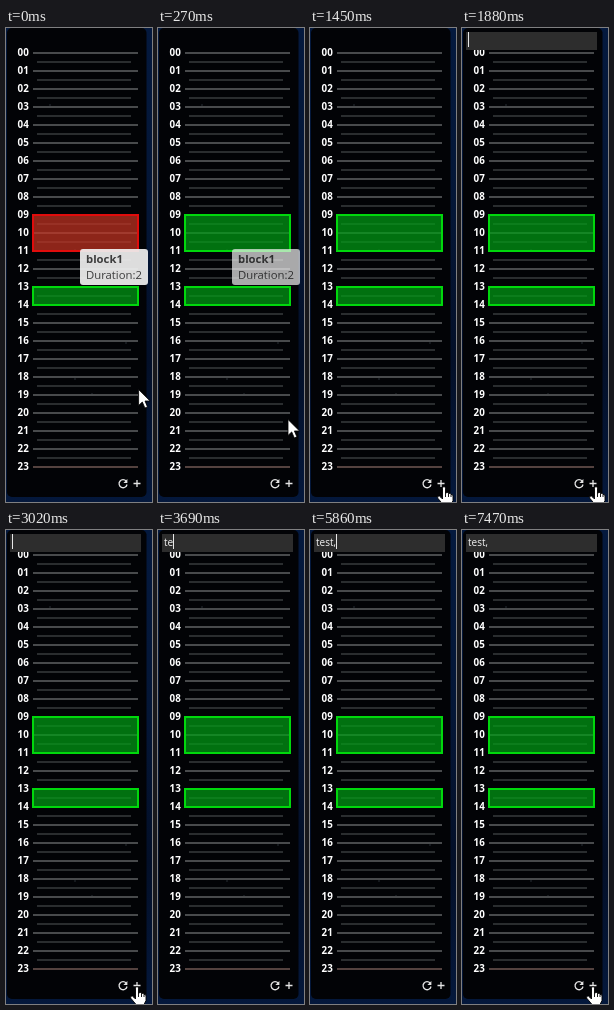
Animation of 146x474 px, one loop 8000 ms. Source, as an HTML page:

```html
<!DOCTYPE html>
<html lang="en">
<head>
<meta charset="utf-8">
<title>Day planner</title>
<style>
html, body { margin: 0; width: 100%; height: 100%; overflow: hidden; background: #030917; }
svg { display: block; }
text { font-family: "Open Sans", "Noto Sans", sans-serif; white-space: pre; }
.hour { font-size: 9.8px; font-weight: 700; fill: #fff; text-anchor: middle; }
.tip { font-size: 11.3px; fill: #404040; }
</style>
</head>
<body>
<svg width="146" height="474" viewBox="0 0 146 474">
  <defs>
    <linearGradient id="sky" x2="0" y2="1">
      <stop offset="0" stop-color="#04193e"/>
      <stop offset=".4" stop-color="#041636"/>
      <stop offset=".7" stop-color="#030f28"/>
      <stop offset="1" stop-color="#04183c"/>
    </linearGradient>
  </defs>
  <rect width="146" height="474" fill="url(#sky)"/>
  <rect x="1" width="139.5" height="469" rx="5" fill="#020306"/>
  <path d="M44 77h0M108 151h0M111 169h0M69 222h0M120 315h0M69 351h0M86 366h0" stroke="#1b1f24" stroke-width="2" stroke-linecap="round"/>
  <g id="grid"></g>
  <g stroke-width="2">
    <rect id="block1" x="27" y="187" width="105" height="36" fill-opacity=".7"/>
    <rect x="27" y="259" width="105" height="18" fill="#00a014" fill-opacity=".7" stroke="#00d80c"/>
  </g>
  <g fill="none" stroke="#e4e4e4" stroke-width="1.3">
    <path d="M120.2 453.2A4 4 0 1 0 121 456.5"/>
    <path d="M121.4 451V455H117.4Z" fill="#e4e4e4" stroke="none"/>
    <path d="M127.5 455.5H134.5M131 452V459"/>
  </g>
  <g id="tooltip">
    <rect x="74" y="221" width="68" height="36" rx="3" fill="#f0f0f0"/>
    <text class="tip" x="80" y="235" font-weight="700">block1</text>
    <text class="tip" x="80" y="251">Duration:2</text>
  </g>
  <g id="field">
    <rect x="4" y="4" width="131" height="18" fill="#2d2d2d"/>
    <text id="typed" x="6" y="15.5" font-size="10" fill="#f2f2f2"></text>
    <rect id="caret" y="4" width="1" height="15" fill="#e8e8e8"/>
  </g>
  <path id="arrow" d="M.5 .5V16.5L4.2 13L6.8 19L9.4 17.9L6.9 12H12Z" fill="#fff" stroke="#000" stroke-width=".8"/>
  <g id="hand" stroke="#000" stroke-width=".9" stroke-linejoin="round">
    <path d="M5.5 13V2.2Q5.5 .5 7 .5T8.5 2.2V7Q11.3 5.7 11.5 7.5Q13.8 6.6 14 8.4Q16 8 16 10V14.5L14 18.5V22H6.5V19L1 12.5Q0 10.8 1.3 10.2T3.5 11Z" fill="#fff"/>
    <path d="M8.5 7V11M11.5 7.5V11M14 8.4V11" fill="none"/>
  </g>
</svg>
<script>
const LOOP = 8000;
const STEP = 127.5;
const BLINK = 525;
const OPEN = 1880, FIRST_KEY = 3540, WORD_END = 4190, COMMA = 5860;
const KEY_LEAD = 120; // the pointer hides this long before text appears

const $ = id => document.getElementById(id);
const show = (el, on) => el.setAttribute("visibility", on ? "visible" : "hidden");
const move = (el, x, y) => el.setAttribute("transform", `translate(${x} ${y})`);
const within = (t, from, to) => t >= from && t < to;

function makeGrid() {
  let out = "";
  for (let hour = 0; hour < 24; hour++) {
    const y = 24 + hour * 18;
    const color = hour < 23 ? "#484a4c" : "#54423f";
    out += `<text class="hour" x="17.2" y="${y + 4}">${String(hour).padStart(2, "0")}</text>`;
    out += `<rect x="27" y="${y}" width="105" height="2" fill="${color}"/>`;
    if (hour < 23) out += `<rect x="31" y="${y + 9}" width="94" height="2" fill="#2a2d2f"/>`;
  }
  $("grid").innerHTML = out;
}

function drawHover(t) {
  const step = Math.floor((t + 8) / STEP);
  const hovered = step < 2;
  $("block1").setAttribute("fill", hovered ? "#c83422" : "#00a014");
  $("block1").setAttribute("stroke", hovered ? "#e00c0c" : "#00d80c");
  $("tooltip").setAttribute("opacity", hovered ? 0.92 : step < 8 ? 0.91 - 0.105 * step : 0);

  // The arrow swings left, then speeds off through the lower right corner.
  show($("arrow"), step < 7);
  move($("arrow"), 129.5 + 0.65 * (step - 2) ** 2, 361 + 106 * (step / 6) ** 1.15);
}

function drawHand(t) {
  const typing = within(t, FIRST_KEY - KEY_LEAD, WORD_END) || within(t, COMMA - KEY_LEAD, 6260);
  show($("hand"), t >= 1300 && !typing);
  if (t < 2280) move($("hand"), t < 1450 ? 128 : 127, 458);
  else move($("hand"), 124, 456);
}

function typedText(t) {
  if (t < FIRST_KEY) return "";
  if (t >= COMMA) return "test,";
  const progress = Math.min(1, (t - FIRST_KEY) / (WORD_END - FIRST_KEY));
  return "test".slice(0, 1 + Math.floor(3 * progress ** 0.741));
}

function drawField(t) {
  const open = t >= OPEN;
  show($("field"), open);
  $("typed").textContent = typedText(t);
  $("caret").setAttribute("x", 6 + Math.round($("typed").getComputedTextLength()));

  // Blinking restarts after each burst of keys; the caret stays lit during one.
  const restart = t < FIRST_KEY ? OPEN : t < COMMA ? Math.min(t, WORD_END) : COMMA;
  show($("caret"), open && Math.floor((t - restart) / BLINK) % 2 === 0);
}

function draw(t) {
  drawHover(t);
  drawHand(t);
  drawField(t);
}

makeGrid();
const start = performance.now();
function tick() {
  draw((performance.now() - start) % LOOP);
  requestAnimationFrame(tick);
}
tick();
</script>
</body>
</html>
```
